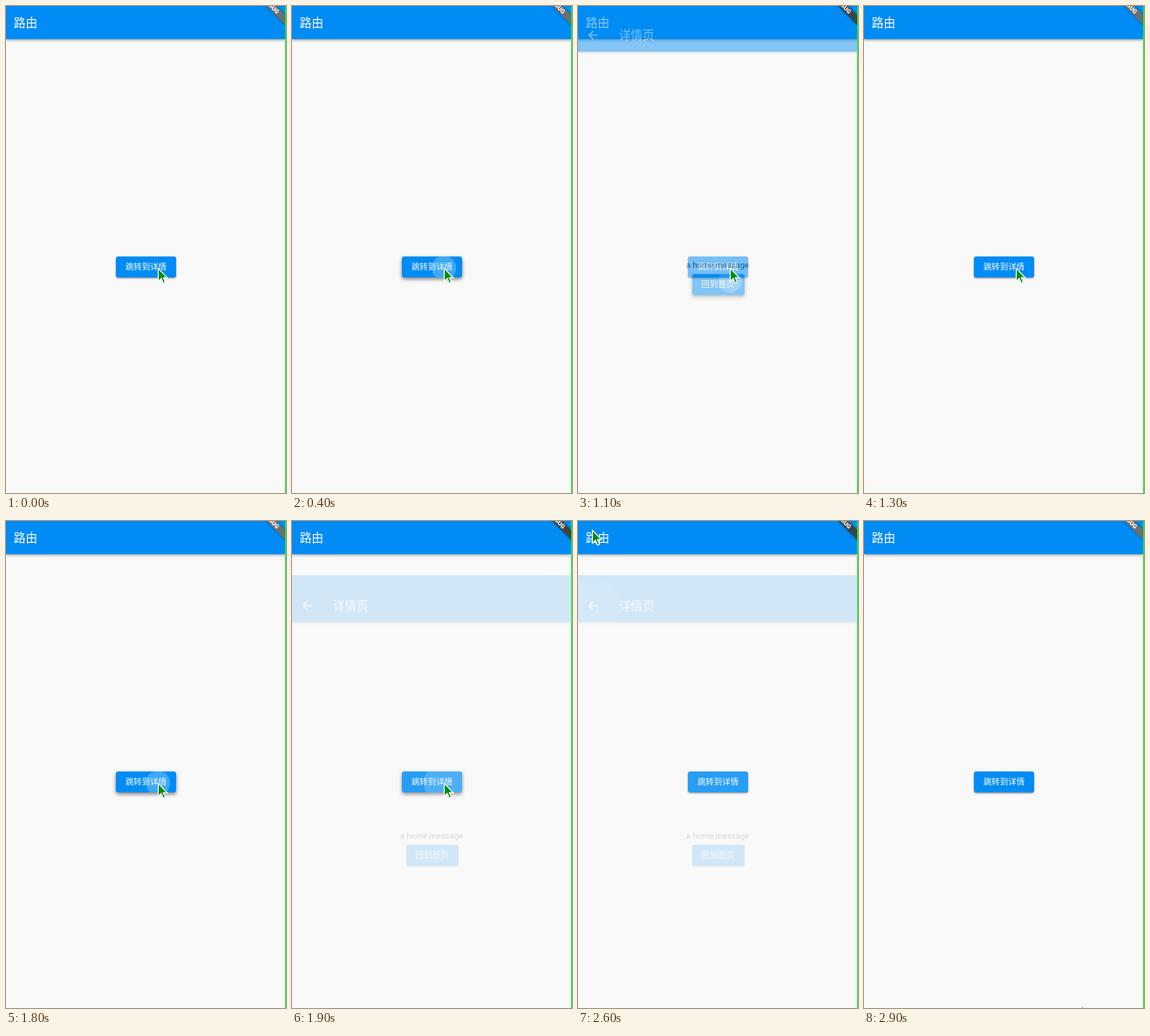
Recreate the animation shown at these times as an HTML page. Size 321 by 558 pixels, loop 3000 ms.

```html
<!DOCTYPE html>
<html lang="zh-CN">
<head>
<meta charset="utf-8">
<title>路由</title>
<style>
  html, body { margin: 0; width: 100%; height: 100%; overflow: hidden; }
  body { position: relative; background: #f9f9f9; }
  body, button { font: 9.45px/1 Roboto, "Noto Sans CJK SC", "Noto Sans CJK", sans-serif; }
  div, svg { position: absolute; }
  #stage { left: 0; top: 0; width: 321px; height: 558px; overflow: hidden; }
  /* The status bar lies above the visible area. */
  .page { left: 0; top: -16px; width: 320px; height: 574px; background: #f9f9f9; }
  .bar {
    left: 0; top: 0; width: 320px; height: 54px;
    background: #008cf4; box-shadow: 0 1px 3px rgba(0, 0, 0, .42);
    clip-path: inset(0 0 -8px 0);
  }
  .title { top: 16px; font-size: 13.5px; line-height: 38px; color: #fff; white-space: nowrap; }
  .button {
    height: 24px; line-height: 24px; border-radius: 2.7px; text-align: center;
    color: #fff; background: #008cf4; white-space: nowrap;
    box-shadow: 0 1px 2px rgba(0, 0, 0, .45);
  }
  .button.pressed { box-shadow: 0 2px 4px rgba(0, 0, 0, .5); }
  .clip { inset: 0; overflow: hidden; border-radius: inherit; }
  .ripple { border-radius: 50%; background: #fff; transform: translate(-50%, -50%); }
  #message { left: 0; top: 293px; width: 320px; line-height: 12px; text-align: center; color: #2b2b2b; }
  #banner {
    left: 276.8px; top: -3.9px; width: 54px; height: 8.1px; transform: rotate(45deg);
    font-size: 6.9px; font-weight: 900; line-height: 8.1px; text-align: center;
    color: #fff; box-shadow: 0 0 3px rgba(0, 0, 0, .35);
  }
  #edge { left: 320px; top: 0; width: 1px; height: 558px; background: #0f2; }
  #cursor { left: 0; top: 0; overflow: visible; }
</style>
</head>
<body>
<div id="stage">
  <div class="page">
    <div class="bar"></div>
    <div class="title" style="left:9px">路由</div>
    <div class="button" id="open" style="left:126px;top:303px;width:69px">跳转到详情
      <div class="clip"><div class="ripple" style="left:48px;top:13px"></div></div>
    </div>
  </div>
  <div class="page" id="detail">
    <div class="bar"></div>
    <svg width="16.2" height="16.2" viewBox="0 0 24 24" style="left:9px;top:27px">
      <path fill="#fff" d="M20 11H7.83l5.59-5.59L12 4l-8 8 8 8 1.41-1.41L7.83 13H20z"/>
    </svg>
    <div class="clip"><div class="ripple" id="backRipple" style="left:17px;top:35px"></div></div>
    <div class="title" style="left:47px">详情页</div>
    <div id="message">a home message</div>
    <div class="button" id="back" style="left:130.5px;top:308.5px;width:60px">回到首页
      <div class="clip"><div class="ripple" style="left:44px;top:8px"></div></div>
    </div>
  </div>
  <div id="banner">DEBUG</div>
  <div id="edge"></div>
  <svg id="cursor" width="12" height="19">
    <path d="M.5 .5V15.5L4 12.3 6.3 17.6 8.7 16.6 6.4 11.4H11Z" stroke="#fff" stroke-width="1.1"/>
  </svg>
</div>
<script>
const LOOP = 3000, STEP = 100, TRANSITION = 300, SLIDE = 143.5;
const $ = id => document.getElementById(id);
const clamp = v => Math.min(1, Math.max(0, v));

function bezier(x1, y1, x2, y2) {
  const at = (a, b, s) => 3 * a * s * (1 - s) ** 2 + 3 * b * s * s * (1 - s) + s ** 3;
  return x => {
    let low = 0, high = 1;
    for (let i = 0; i < 24; i++) {
      const mid = (low + high) / 2;
      if (at(x1, x2, mid) < x) low = mid; else high = mid;
    }
    return at(y1, y2, (low + high) / 2);
  };
}
const fastOutSlowIn = bezier(.4, 0, .2, 1);
const easeIn = bezier(.42, 0, 1, 1);

// Cursor stops: time, x, y
const path = [
  [0, 174, 300], [2000, 174, 300], [2200, 19, 14], [2500, 19, 14],
  [2600, 16, 10], [2700, 16, 10], [2900, 249, 555], [3000, 249, 555]
];
function cursorAt(time) {
  const i = path.findIndex(stop => stop[0] > time);
  const [t0, x0, y0] = path[i - 1], [t1, x1, y1] = path[i];
  const k = (time - t0) / (t1 - t0);
  return [x0 + (x1 - x0) * k, y0 + (y1 - y0) * k];
}

const ramp = (time, start) => clamp((time - start) / TRANSITION);
const visibility = time =>
  ramp(time, 440) - ramp(time, 990) + ramp(time, 1800) - ramp(time, 2400);

function setRipple(element, time, ...starts) {
  const age = starts.map(start => time - start).find(a => a >= 0 && a < 360);
  const active = age !== undefined;
  const size = active ? 8 + age * .18 : 0;
  element.style.width = element.style.height = size + "px";
  element.style.opacity = active ? .24 * clamp((360 - age) / 200) : 0;
  return active;
}

function pressButton(id, time, ...starts) {
  const button = $(id);
  const active = setRipple(button.querySelector(".ripple"), time, ...starts);
  button.classList.toggle("pressed", active);
}

function draw() {
  const time = Math.floor(performance.now() % LOOP / STEP) * STEP;
  const shown = visibility(time);
  const detail = $("detail").style;
  detail.opacity = shown < .001 ? 0 : shown > .999 ? 1 : easeIn(shown);
  detail.transform = `translateY(${SLIDE * (1 - fastOutSlowIn(shown))}px)`;

  pressButton("open", time, 290, 1690);
  pressButton("back", time, 990);
  setRipple($("backRipple"), time, 2290);

  $("banner").style.background = shown > .001 ? "#3f4347" : "#6c6e70";
  const [x, y] = cursorAt(time);
  $("cursor").style.transform = `translate(${x}px, ${y}px)`;
  const dark = time >= 2800 || time >= 2100 && time < 2400;
  $("cursor").style.fill = dark ? "#000" : "#088a10";
  requestAnimationFrame(draw);
}
draw();
</script>
</body>
</html>
```
